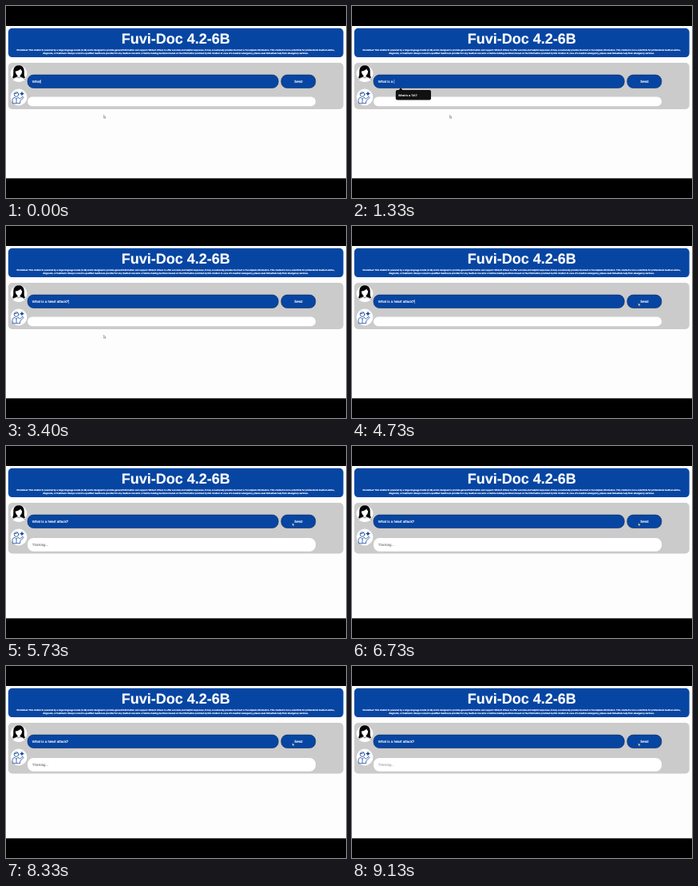
Animation, 426 px wide and 240 px high, one loop 9.19 s. Source, as an HTML page:

```html
<!DOCTYPE html>
<html lang="en">
<head>
<meta charset="utf-8">
<title>Health chatbot</title>
<style>
  html, body { margin: 0; width: 100%; height: 100%; overflow: hidden; background: #000; }
  svg { display: block; width: 100vw; height: 100vh; }
  text {
    font: 4.44px "Liberation Sans", Arial, sans-serif;
    fill: #fff;
    stroke: #fff;
    stroke-width: .14;
    white-space: pre;
    text-rendering: geometricPrecision;
  }
  .title { font-size: 18px; font-weight: bold; }
  .note { font-size: 2.66px; font-weight: bold; }
  .hint { font-size: 3.6px; }
  .mid { text-anchor: middle; }
  .blue { fill: #0745a2; }
  .field { stroke: #08265f; stroke-width: .6; }
  .line { fill: none; stroke: #174b9b; stroke-width: .8; stroke-linecap: round; stroke-linejoin: round; }
  #thinking { fill: #4a4d55; stroke: none; }
</style>
</head>
<body>
<svg viewBox="0 0 426 240">
  <rect width="426" height="240"/>
  <rect y="25" width="426" height="190.4" fill="#fdfdfd"/>

  <rect class="blue" x="2.8" y="27.8" width="419.9" height="36.3" rx="5"/>
  <text class="title mid" x="212.8" y="47.1">Fuvi-Doc 4.2-6B</text>
  <text class="note mid" x="212.5" y="56.2">Disclaimer: This chatbot is powered by a large language model (LLM) and is designed to provide general information and support. While it strives to offer accurate and helpful responses, it may occasionally provide incorrect or incomplete information. This chatbot is not a substitute for professional medical advice,</text>
  <text class="note mid" x="212.5" y="59.8">diagnosis, or treatment. Always consult a qualified healthcare provider for any medical concerns or before making decisions based on the information provided by this chatbot. In case of a medical emergency, please seek immediate help from emergency services.</text>

  <rect id="panel" x="2.8" y="71" width="419.9" height="58" rx="5" fill="#cbcbcb"/>

  <!-- user avatar -->
  <circle cx="16" cy="84.5" r="10.4" fill="#fff"/>
  <path d="M7.8 89.6C10 87 8.8 84 9.4 80C10 76 12.6 74.3 16 74.3S22 76 22.6 80C23.2 84 22 87 24.2 89.6Q20 91.2 16 90.7Q12 91.2 7.8 89.6Z" fill="#050505"/>
  <path d="M11.9 81.4Q16.5 81 18.2 78.4Q18.8 80.3 20.1 81.2C20.1 84.6 18.2 87.2 16 87.2S11.9 84.6 11.9 81.4Z" fill="#fff"/>
  <path d="M14.4 86.4V88.3Q9 89.4 8.2 92.4Q16 97 23.8 92.4Q23 89.4 17.6 88.3V86.4Q16 87.8 14.4 86.4Z" fill="#fff"/>
  <path d="M8.3 92.2Q9 89.7 14 88.5L16 90L18 88.5Q23 89.7 23.7 92.2" fill="none" stroke="#111" stroke-width=".5"/>

  <!-- assistant avatar -->
  <circle cx="16" cy="114" r="10.4" fill="#fff"/>
  <g class="line">
    <circle cx="13" cy="110.5" r="2.8"/>
    <path d="M10.2 109.7Q13.5 110 14.8 108.2"/>
    <path d="M8.4 121.3L8 117.4Q8.2 115 11 114.3L13 116.3L15 114.3Q16.6 114.8 17.4 116.2L21 113.2L22 114.4L17.6 119V121.3Z"/>
    <path d="M13 116.3V121"/>
  </g>
  <path d="M20 106.6L20.9 108.8L23.1 109.7L20.9 110.6L20 112.8L19.1 110.6L16.9 109.7L19.1 108.8Z" fill="#0d3f92"/>

  <rect class="blue field" x="27" y="86.1" width="314.2" height="16.4" rx="7.5"/>
  <text id="query" x="32.7" y="95.8"></text>
  <rect id="caret" y="92" width=".5" height="4.9" fill="#fff"/>
  <rect class="blue field" x="344.8" y="86.1" width="43" height="16.4" rx="7.5"/>
  <text class="mid" x="366.4" y="95.8">Send</text>

  <rect id="answer" x="27" y="113.5" width="361" height="11.7" rx="5.8" fill="#fff"/>
  <text id="thinking" x="32.8" y="125.1">Thinking...</text>

  <g id="hint">
    <path d="M58.5 105.3L61 102.3L63.5 105.3Z" fill="#111"/>
    <rect x="54.8" y="104.9" width="44.2" height="12.6" rx="2" fill="#111"/>
    <text class="hint" x="58" y="112.5">What is a TIA?</text>
  </g>

  <path id="pointer" d="M0 0V3.7L.9 2.9L1.5 4.2L2.1 3.9L1.5 2.7H2.7Z" fill="#fff" stroke="#333" stroke-width=".35"/>
</svg>
<script>
  const LOOP = 9190, SENT = 5100, TYPED = 3250;
  const QUESTION = "What is a heart attack?";
  const $ = id => document.getElementById(id);
  const [panel, query, caret, answer, thinking, hint, pointer] =
    ["panel", "query", "caret", "answer", "thinking", "hint", "pointer"].map($);

  const ramp = (t, from, to) => Math.min(1, Math.max(0, (t - from) / (to - from)));
  const ease = p => p * p * (3 - 2 * p);
  const show = (el, on) => el.setAttribute("visibility", on ? "visible" : "hidden");

  // Four letters are already there; a pause follows "What is a ".
  const lettersAt = t =>
    4 + Math.floor(6 * ramp(t, 130, 1250)) + Math.floor(13 * ramp(t, 1550, TYPED));

  function draw(t) {
    const sent = t >= SENT;

    query.textContent = QUESTION.slice(0, lettersAt(t));
    caret.setAttribute("x", 32.9 + query.getComputedTextLength());
    show(caret, !sent && (t < TYPED || (t - TYPED) % 1060 < 530));
    show(hint, t >= 1000 && t < 1750);

    panel.setAttribute("height", sent ? 63.5 : 58);
    answer.setAttribute("y", sent ? 115 : 113.5);
    answer.setAttribute("height", sent ? 16.8 : 11.7);
    answer.setAttribute("rx", sent ? 7.5 : 5.8);
    show(thinking, sent);
    thinking.setAttribute("opacity", 1 - .35 * ramp(t, 8600, 9130));

    const p = ease(ramp(t, 3650, 4500));
    pointer.setAttribute("transform", `translate(${122.4 + 236.4 * p} ${136.4 - 40.2 * p})`);
  }

  function tick() {
    draw(performance.now() % LOOP);
    requestAnimationFrame(tick);
  }
  tick();
</script>
</body>
</html>
```
